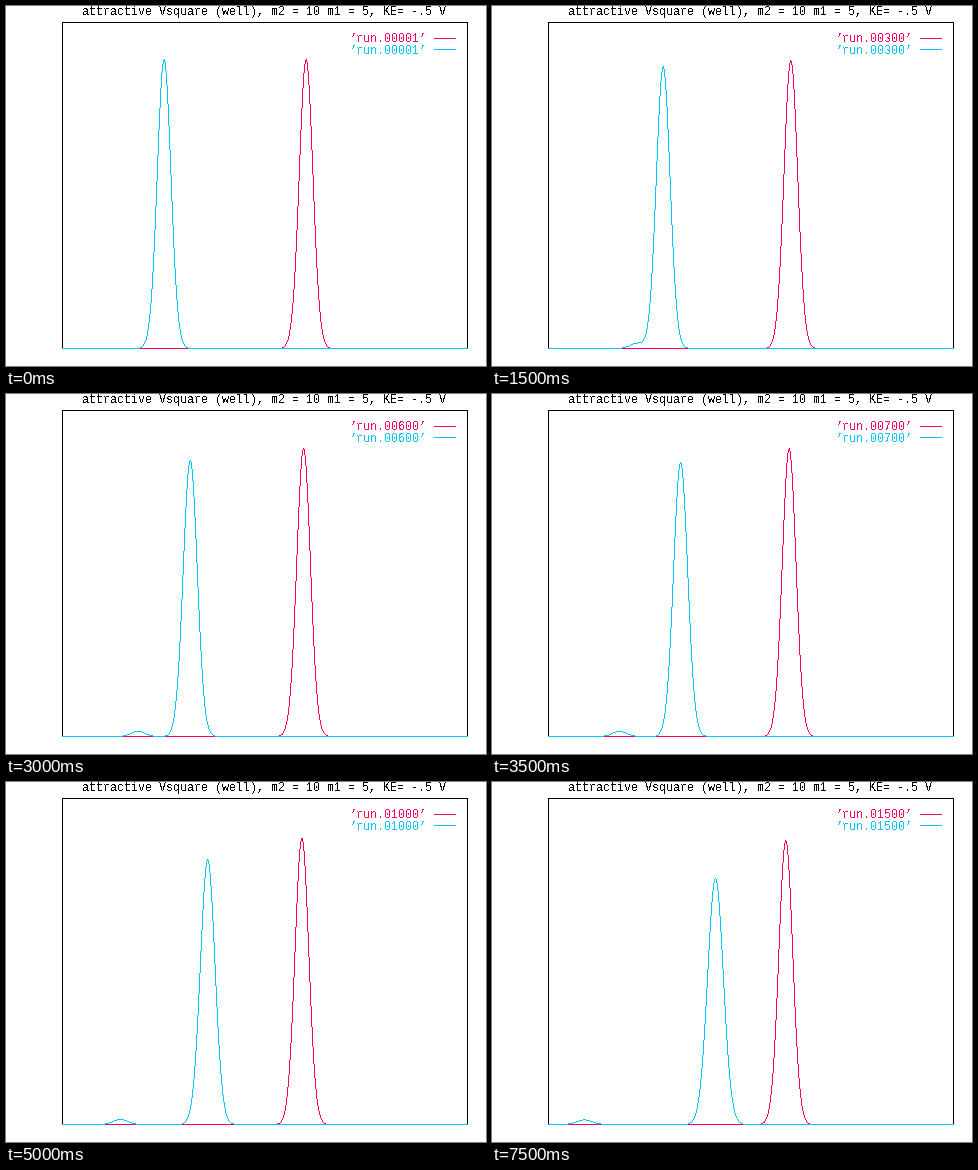
These frames come from a looping animation (480 px wide and 360 px high, 8000 ms). A matplotlib script:

```python
import numpy as np
import matplotlib.pyplot as plt
from matplotlib.animation import FuncAnimation
from matplotlib.collections import LineCollection

W, H, DPI = 480, 360, 80
PX = 72 / DPI  # points per pixel
LEFT, RIGHT, TOP, BASE = 56, 461, 16, 342
RED, CYAN = "#ff0066", "#00c8ff"
FRAMES, STEP = 16, 500
SIGMA = 6.8

fig = plt.figure(figsize=(W / DPI, H / DPI), dpi=DPI, facecolor="white")
ax = fig.add_axes([0, 0, 1, 1])
ax.set_xlim(0, W)
ax.set_ylim(H, 0)
ax.axis("off")

x = np.arange(LEFT, RIGHT + 1)


def line(xs, ys, color):
    """One-pixel straight line through pixel centres."""
    ax.plot(np.asarray(xs) + 0.5, np.asarray(ys) + 0.5, color=color, lw=PX,
            antialiased=False, snap=False, solid_capstyle="projecting",
            solid_joinstyle="miter")


def label(px, baseline, text, color):
    return ax.text(px, baseline, text, color=color, family="Liberation Mono",
                   size=7 / 0.6 * PX, va="baseline", ha="left",
                   antialiased=False)


def trace(color):
    """Empty curve, later filled with one-pixel-wide column runs."""
    runs = LineCollection([], colors=color, linewidths=PX, capstyle="butt",
                          antialiaseds=False)
    runs.set_snap(False)
    return ax.add_collection(runs, autolim=False)


def column_runs(y):
    """Split a curve into vertical runs that meet halfway between samples."""
    mid = np.floor((y[:-1] + y[1:] + 1) / 2)
    before = np.append(y[0], mid)
    after = np.append(mid, y[-1])
    top = np.minimum(y, np.minimum(before, after))
    bottom = np.maximum(y + 1, np.maximum(before, after))
    xc = x + 0.5
    return np.stack([np.column_stack([xc, top]),
                     np.column_stack([xc, bottom])], axis=1)


def packet(t, x0, speed, height, spread):
    """Gaussian density that drifts and widens with time."""
    grow = np.sqrt(1 + (t / spread) ** 2)
    u = (x - x0 - speed * t) / (SIGMA * grow)
    return height / grow * np.exp(-u * u / 2)


line([LEFT, RIGHT, RIGHT, LEFT, LEFT], [TOP, TOP, BASE, BASE, TOP], "black")
label(76.5, 9.5, "attractive Vsquare (well), m2 = 10 m1 = 5, KE= -.5 V", "black")

curves, keys = [], []
for color, row in ((RED, 32), (CYAN, 43)):
    curves.append(trace(color))
    keys.append(label(343.5, row + 4.5, "", color))
    line([428, 449], [row, row], color)


def update(i):
    heavy = packet(i, 299.6, -0.42, 289, 80)
    passed = packet(i, 157.6, 4.36, 283.7, 26)
    bounced = packet(i, 157.6, -4.36, 5.3, 26)
    for curve, density in zip(curves, (heavy, passed + bounced)):
        curve.set_segments(column_runs(np.round(BASE - density)))
    for key in keys:
        key.set_text(f"\u2019run.{max(1, 100 * i):05d}\u2019")
    return curves + keys


anim = FuncAnimation(fig, update, frames=FRAMES, interval=STEP,
                     repeat=True, repeat_delay=0, blit=False)
plt.show()
```
